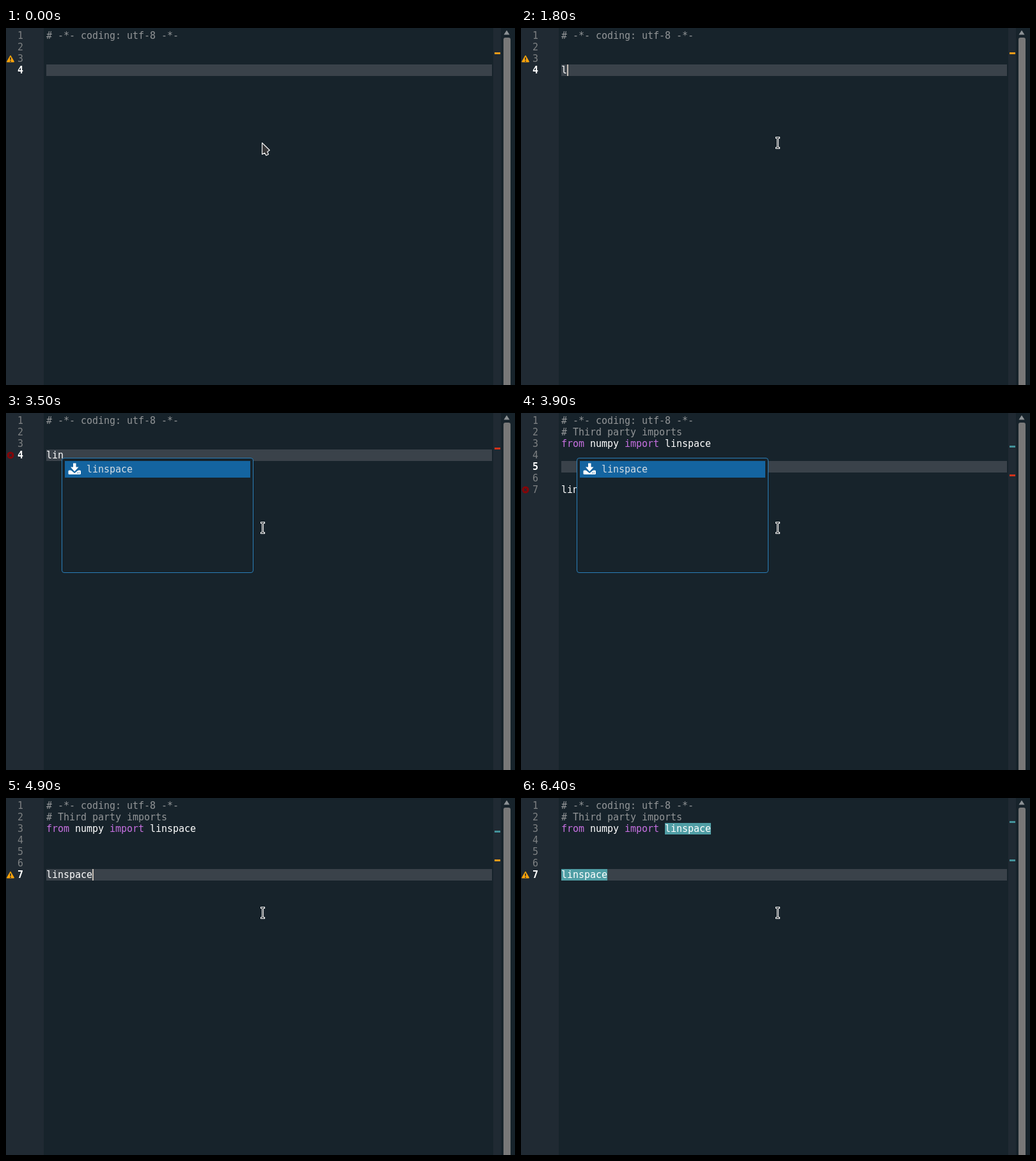
Write an HTML page with a canvas that moves like this. It is 796x558 px and loops after 6.9 s.

```html
<!DOCTYPE html>
<html lang="en">
<head>
<meta charset="utf-8">
<title>Automatic import</title>
<style>
html, body { margin: 0; width: 100%; height: 100%; overflow: hidden; background: #17232b; }
canvas { display: block; }
</style>
</head>
<body>
<canvas id="stage" width="796" height="558"></canvas>
<script>
const ctx = document.getElementById('stage').getContext('2d');
const LOOP = 6900, STEP = 100;
const CHAR = 9, LINE = 18, LEFT = 63;
const FONT = '15px "DejaVu Sans Mono", monospace';
const C = {
  bg: '#17232b', side: '#202a33', line: '#3a424a', text: '#ffffff', comment: '#929597',
  keyword: '#c670e0', number: '#7d8082', match: '#509ea5', caret: '#c5bdb5',
  warn: '#ffa50a', warnFlag: '#ee9a18', errorFlag: '#d2321a', matchFlag: '#43929a', error: '#850508',
  accent: '#1464a0', border: '#2a7fba', handle: '#787878'
};
const HEADER = ['# -*- coding: utf-8 -*-', C.comment];
const IMPORTS = ['# Third party imports', C.comment];

const lineTop = n => 3 + (n - 1) * LINE;
const within = (t, from, to) => t >= from && t < to;

function rect(x, y, w, h, color) {
  ctx.fillStyle = color;
  ctx.fillRect(x, y, w, h);
}

function path(points) {
  ctx.beginPath();
  points.forEach(([x, y]) => ctx.lineTo(x, y));
  ctx.closePath();
}

function rounded(x, y, w, h, r) {
  ctx.beginPath();
  ctx.roundRect(x, y, w, h, r);
}

// One glyph per cell keeps the whole-pixel advance of the editor.
function text(str, x, base, color, bold) {
  ctx.font = (bold ? 'bold ' : '') + FONT;
  ctx.fillStyle = color;
  [...str].forEach((ch, i) => { if (ch !== ' ') ctx.fillText(ch, x + i * CHAR, base); });
}

function code(n, str, color = C.text, col = 0) {
  text(str, LEFT + col * CHAR, lineTop(n) + 14, color);
}

function warning(n) {
  const y = lineTop(n) + 9;
  ctx.fillStyle = ctx.strokeStyle = C.warn;
  ctx.lineWidth = 1.5;
  ctx.lineJoin = 'round';
  path([[7, y - 4.5], [12.2, y + 4.7], [1.8, y + 4.7]]);
  ctx.fill();
  ctx.stroke();
  rect(6.2, y - 2, 1.6, 4, C.side);
  rect(6.2, y + 3, 1.6, 1.6, C.side);
}

function error(n) {
  const x = 7, y = lineTop(n) + 9, d = 2;
  ctx.fillStyle = C.error;
  ctx.beginPath();
  ctx.arc(x, y, 5.5, 0, Math.PI * 2);
  ctx.fill();
  ctx.strokeStyle = C.side;
  ctx.lineWidth = 1.5;
  ctx.beginPath();
  ctx.moveTo(x - d, y - d);
  ctx.lineTo(x + d, y + d);
  ctx.moveTo(x + d, y - d);
  ctx.lineTo(x - d, y + d);
  ctx.stroke();
}

const flag = (y, color) => rect(764, y, 9, 3, color);

function frame(lines, current) {
  rect(0, 0, 796, 558, C.bg);
  rect(0, 0, 59, 558, C.side);
  rect(762, 0, 12, 558, C.side);
  for (let n = 1; n <= lines; n++) {
    const on = n === current;
    text(String(n), 18, lineTop(n) + 14, on ? C.text : C.number, on);
  }
  rect(LEFT, lineTop(current), 697, LINE, C.line);
  ctx.fillStyle = '#8d9295';
  path([[783, 3.5], [787.5, 10.5], [778.5, 10.5]]);
  ctx.fill();
  ctx.fillStyle = C.handle;
  rounded(778, 15, 11, 560, 3);
  ctx.fill();
}

function popup() {
  ctx.fillStyle = C.bg;
  ctx.strokeStyle = C.border;
  ctx.lineWidth = 1;
  rounded(87.5, 70.5, 299, 179, 3.5);
  ctx.fill();
  ctx.stroke();
  rect(92, 75, 290, 26, C.accent);
  text('linspace', 126, 93, '#d5dde3');

  // Download icon: tray, then the arrow with a gap around it.
  ctx.fillStyle = '#ffffff';
  rounded(97.5, 89.5, 19.5, 6.5, 1.5);
  ctx.fill();
  ctx.fillStyle = C.accent;
  path([[101, 89], [113.5, 89], [107.2, 94]]);
  ctx.fill();
  rect(111, 93, 1.3, 1.3, C.accent);
  rect(113.6, 93, 1.3, 1.3, C.accent);
  ctx.fillStyle = '#ffffff';
  path([[105, 78.5], [109.5, 78.5], [109.5, 84.5], [113.5, 84.5], [107.2, 91.5], [101, 84.5], [105, 84.5]]);
  ctx.fill();
}

function arrowPointer() {
  path([[400.5, 179.5], [412.3, 191], [408.8, 193.5], [410.5, 197.5], [406.8, 199.3], [404.5, 195.3], [400.5, 197.5]]);
  ctx.fillStyle = '#39393b';
  ctx.strokeStyle = '#ffffff';
  ctx.lineWidth = 1.1;
  ctx.lineJoin = 'round';
  ctx.fill();
  ctx.stroke();
}

function beam(x, y) {
  const bars = [[-3, -9, 7, 3], [-3, 7, 7, 3], [-1, -9, 3, 19]];
  bars.forEach(([dx, dy, w, h]) => rect(x + dx, y + dy, w, h, '#ffffff'));
  bars.forEach(([dx, dy, w, h]) => rect(x + dx + 1, y + dy + 1, w - 2, h - 2, '#1c2227'));
}

function pointer(t) {
  if (t < 100) return arrowPointer();
  const k = within(t, 6000, 6400) ? (t - 5900) / 400 : 0;
  beam(401 + Math.round(3 * k), 179 - Math.round(179 * k * k));
}

function caretOn(t) {
  return [[400, 900], [1400, 1900], [2100, 2400], [2900, 3000], [4000, 4400], [4900, 5400], [5900, 6400]]
    .some(([from, to]) => within(t, from, to));
}

function caret(t, n, col) {
  if (caretOn(t)) rect(LEFT + col * CHAR, lineTop(n), 2, LINE, C.caret);
}

function typing(t) {
  const typed = 'lin'.slice(0, [1800, 2100, 2300].filter(k => t >= k).length);
  frame(4, 4);
  code(1, ...HEADER);
  code(4, typed);
  caret(t, 4, typed.length);
  if (t < 3500) {
    warning(3);
    flag(38, C.warnFlag);
  } else {
    error(4);
    flag(54, C.errorFlag);
  }
}

function imported(t) {
  const done = t >= 4000, checked = t >= 4500, matched = t >= 5400;
  frame(7, done ? 7 : 5);
  if (matched) {
    rect(LEFT + 18 * CHAR, lineTop(3), 8 * CHAR, LINE, C.match);
    rect(LEFT, lineTop(7), 8 * CHAR, LINE, C.match);
  }
  code(1, ...HEADER);
  code(2, ...IMPORTS);
  code(3, 'from', C.keyword);
  code(3, 'numpy', C.text, 5);
  code(3, 'import', C.keyword, 11);
  code(3, 'linspace', C.text, 18);
  code(7, done ? 'linspace' : 'lin');
  caret(t, 7, 8);
  (checked ? warning : error)(7);
  flag(matched ? 36 : 51, C.matchFlag);
  flag(96, matched ? C.matchFlag : checked ? C.warnFlag : C.errorFlag);
}

function draw() {
  const t = Math.floor(performance.now() % LOOP / STEP) * STEP;
  (t < 3900 ? typing : imported)(t);
  if (within(t, 3000, 4000)) popup();
  pointer(t);
  requestAnimationFrame(draw);
}
draw();
</script>
</body>
</html>
```
